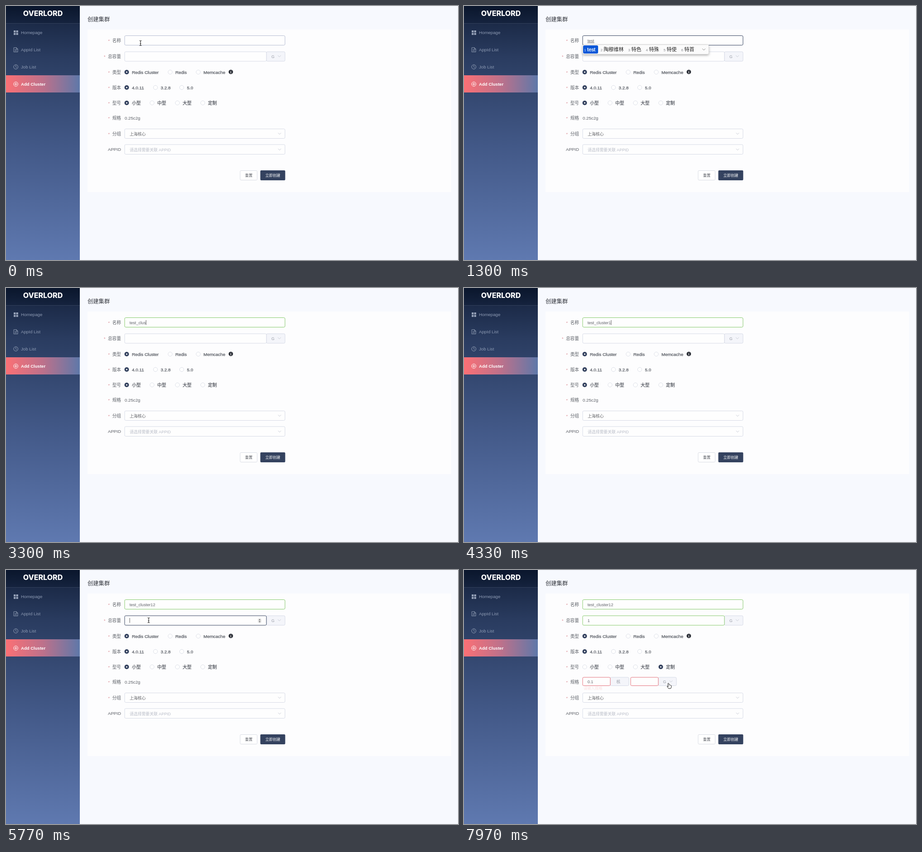
An HTML page that plays this animation: 998 px wide and 561 px high, repeating every 8 s.

```html
<!DOCTYPE html>
<html lang="zh">
<head>
<meta charset="utf-8">
<title>创建集群</title>
<style>
  html, body { margin: 0; width: 100%; height: 100%; overflow: hidden; background: #f7f9fe; }
  svg { display: block; width: 100%; height: 100%; }
  text { font-family: "Liberation Sans", "Noto Sans CJK SC", "Noto Sans CJK", sans-serif; font-size: 9.7px; fill: #5c6067; white-space: pre; }
  .brand { font: 800 16px Inter, sans-serif; fill: #fff; }
  .menu { fill: #8d9ab3; }
  .active { font-weight: bold; font-size: 9.55px; fill: #fff; }
  .title { font-size: 12.3px; fill: #33363d; }
  .option { font-size: 9.85px; fill: #53575f; stroke: #53575f; stroke-width: .25px; }
  .value { font-size: 9.15px; fill: #60636a; }
  .select { font-size: 8.9px; fill: #606266; }
  .hint { font-size: 8.85px; fill: #b9bdc8; }
  .unit { font-size: 8.8px; fill: #999da6; }
  .button { font-size: 8.3px; font-weight: 500; fill: #55585f; }
  .error { font-size: 8.3px; fill: #f56c6c; }
  .star { font-size: 9px; fill: #d98a92; }
  .index { font-size: 8px; fill: #85878c; }
  .word { font-size: 11px; fill: #222; }
  .picked { font-size: 11.3px; font-weight: 500; fill: #fff; stroke: #fff; stroke-width: .3px; }
</style>
</head>
<body>
<svg viewBox="0 0 998 561">
  <defs>
    <linearGradient id="side" x2="0" y2="1">
      <stop offset="0" stop-color="#14213b"/><stop offset=".2" stop-color="#2a3c60"/>
      <stop offset=".55" stop-color="#425887"/><stop offset="1" stop-color="#5f79b0"/>
    </linearGradient>
    <linearGradient id="head" x2="0" y2="1">
      <stop offset="0" stop-color="#0a162c"/><stop offset="1" stop-color="#15233e"/>
    </linearGradient>
    <linearGradient id="current">
      <stop offset="0" stop-color="#fb7075"/><stop offset=".5" stop-color="#bd718b"/><stop offset="1" stop-color="#5e78a9"/>
    </linearGradient>
    <filter id="shadow" x="-5%" y="-30%" width="110%" height="180%">
      <feDropShadow dx="0" dy="2" stdDeviation="2.5" flood-opacity=".3"/>
    </filter>
  </defs>
  <g id="page"></g>
  <g id="live"></g>
</svg>
<script>
const LOOP = 8000;
const DARK = '#34425f', PLAIN = '#d6dae6', HOVER = '#b6bdd2', GREEN = '#84c96a', RED = '#e4707b';

const text = (x, y, str, cls = '', anchor = 'start') =>
  `<text x="${x}" y="${y + 3.5}" class="${cls}" text-anchor="${anchor}">${str}</text>`;
const rect = (x, y, w, h, fill, stroke = 'none', r = 0) =>
  `<rect x="${x}" y="${y}" width="${w}" height="${h}" rx="${r}" fill="${fill}" stroke="${stroke}"/>`;
const path = (d, stroke, width = 1, fill = 'none') =>
  `<path d="${d}" stroke="${stroke}" stroke-width="${width}" fill="${fill}" stroke-linejoin="round" stroke-linecap="round"/>`;
const circle = (x, y, r, fill, stroke = 'none') =>
  `<circle cx="${x}" cy="${y}" r="${r}" fill="${fill}" stroke="${stroke}"/>`;
const chevron = (x, y, color = '#c0c4cf') => path(`M${x - 3} ${y - 1.5}l3 3 3-3`, color, .9);
const field = (x, y, w, h, stroke = PLAIN) => rect(x, y, w, h, '#fefefe', stroke, 2.5);
const addon = (x, y, w, h, str, tx) =>
  rect(x, y, w, h, '#f4f5fa', PLAIN, 2.5) + text(tx, y + h / 2, str, 'unit', 'middle');
const spinner = (x, y) => rect(x - 3.5, y - 5, 7, 10, '#f3f3f3', '#e2e2e2', 3) +
  path(`M${x - 1.5} ${y - 1.5}l1.5-2 1.5 2zM${x - 1.5} ${y + 1.5}l1.5 2 1.5-2z`, '#555', .5, '#555');
const caret = (x, y) => path(`M${x} ${y - 5}v10`, '#333', .8);
const radio = (x, y, str, on) =>
  (on ? circle(x, y, 5, DARK) + circle(x, y, 1.6, '#fff') : circle(x, y, 4.6, '#fff', '#dcdfe8')) +
  text(x + 11.5, y, str, 'option');
const label = (y, str) => text(254, y, str, '', 'end') + text(248.5 - str.length * 9.7, y, '*', 'star', 'end');

function drawPage() {
  const gray = '#98a4ba';
  const squares = [[17, 54], [22.5, 54], [17, 59.5], [22.5, 59.5]].map(([x, y]) => rect(x, y, 4.3, 4.3, gray)).join('');
  return rect(0, 0, 998, 561, '#f7f9fe') +
    rect(0, 0, 163, 561, 'url(#side)') + rect(0, 0, 163, 38, 'url(#head)') + rect(0, 38, 163, 1, '#33415c') +
    rect(0, 153, 163, 38, 'url(#current)') +
    text(81.5, 18.8, 'OVERLORD', 'brand', 'middle') +
    squares + text(33, 58.5, 'Homepage', 'menu') +
    path('M17.5 92h5.5l3 3v6.5h-8.5zM23 92v3h3M19.5 96.5h4M19.5 99h4', gray, .9) + text(33, 96.5, 'AppId List', 'menu') +
    circle(21.7, 134.5, 4.8, 'none', gray) + path('M21.7 131.5v3.2l2 1.3', gray, .9) + text(33, 134.5, 'Job List', 'menu') +
    circle(21.7, 172.5, 4.8, 'none', '#fff') + path('M19 172.5h5.4M21.7 169.8v5.4', '#fff') +
    text(33, 172.5, 'Add Cluster', 'active') +
    text(180, 30.3, '创建集群', 'title') +
    rect(180, 52, 803, 359, '#fdfdfe') +
    ['名称', '总容量', '类型', '版本', '型号', '规格', '分组'].map((s, i) => label([76, 111, 146, 180, 214, 247, 282][i], s)).join('') +
    text(254, 316, 'APPID', '', 'end') +
    radio(266.5, 146, 'Redis Cluster', true) + radio(362.5, 146, 'Redis') + radio(424.5, 146, 'Memcache') +
    circle(496.4, 145.6, 4.9, '#2c3038') + path('M496.8 142.8v.2M495.7 145h1l-.6 3.2h.8', '#fff', 1) +
    radio(266.5, 180, '4.0.11', true) + radio(330, 180, '3.2.8') + radio(388, 180, '5.0') +
    field(262, 271.5, 354, 21) + text(273, 282, '上海核心', 'select') + chevron(604, 282) +
    field(262, 306, 354, 21.5) + text(273, 317, '请选择需要关联 APPID', 'hint') + chevron(604, 317) +
    rect(517, 363.5, 37.5, 21, '#fff', '#d9dce4', 2) + text(536, 373.7, '重置', 'button', 'middle') +
    rect(561.5, 363, 55, 22, DARK, 'none', 2) +
    `<g style="--c:#fff">${text(589, 373.7, '立即创建', 'button', 'middle').replace('<text', '<text style="fill:#fff"')}</g>`;
}

// Latest entry of [time, value] pairs that has begun.
const at = (steps, t) => steps.filter(s => s[0] <= t).pop();
const clamp = v => Math.max(0, Math.min(1, v));

function blend(steps, t, duration = 150) {
  const i = steps.indexOf(at(steps, t));
  const share = clamp((t - steps[i][0]) / duration) * 100;
  return i ? `color-mix(in srgb, ${steps[i][1]} ${share}%, ${steps[i - 1][1]})` : steps[i][1];
}

const nameKeys = [[0, ''], [620, 't'], [760, 'te'], [900, 'tes'], [1040, 'test'], [2150, 'test_'], [2560, 'test_c'],
  [2780, 'test_cl'], [2980, 'test_clu'], [3160, 'test_clus'], [3440, 'test_clust'], [3600, 'test_cluste'],
  [3780, 'test_cluster'], [4130, 'test_cluster1'], [4520, 'test_cluster12']];
const sizeKeys = [[0, ''], [5950, '1']];
const coreKeys = [[0, ''], [7120, '0'], [7270, '0.'], [7420, '0.1']];
const nameBorder = [[0, HOVER], [320, DARK], [1560, GREEN]];
const sizeBorder = [[0, PLAIN], [5450, DARK], [5950, GREEN]];
const coreBorder = [[0, PLAIN], [6850, DARK], [7840, RED]];
const memoryBorder = [[0, PLAIN], [7840, RED]];
const FOCUS = { name: [320, 5450], size: [5450, 6430], core: [6850, 7840] };
const COMMIT = 1560, CUSTOM = 6430, INVALID = 7840;

const candidates = {
  t: ['他', '她', '它', '太', '听', '天'],
  te: ['特', '忒', '特别', '特色', '特殊', '特使'],
  tes: ['特殊', '特色', '特使', '特首', '特设', '特'],
  test: ['test', '陶穆维林', '特色', '特殊', '特使', '特首']
};

function imePopup(words) {
  let x = 265, items = '';
  words.forEach((word, i) => {
    const end = x + 7 + word.length * (word < '~' ? 4.9 : 11);
    if (!i) items += rect(263, 87, end + 4.5 - 263, 18, '#0b58d8', 'none', 3);
    items += text(x, 96.3, i + 1, 'index').replace('<text', i ? '<text' : '<text style="fill:#dbe7ff"') +
      text(x + 7, 96, word, i ? 'word' : 'picked');
    x = end + 10;
  });
  return `<g filter="url(#shadow)">${rect(262, 85.5, x + 22 - 262, 21, '#fbfbfb', '#d4d4d4', 3)}</g>` +
    items + chevron(x + 11, 96, '#777');
}

const measure = document.createElement('canvas').getContext('2d');
measure.font = '9.15px "Liberation Sans", sans-serif';

function typed(x, y, keys, [from, to], t, composing) {
  const [time, value] = at(keys, t);
  const width = measure.measureText(value).width;
  const blinkOn = (t - Math.max(time, from)) % 1060 < 530;
  return text(x, y, value, 'value') +
    (composing ? path(`M${x} ${y + 5}h${width}`, '#555', .8) : '') +
    (t >= from && t < to && blinkOn && !composing ? caret(x + width + .5, y) : '');
}

const moves = [[0, 297, 82], [4850, 297, 82], [5380, 315, 111], [6030, 315, 111], [6370, 437, 215], [6450, 437, 215],
  [6710, 290.5, 251], [7500, 290.5, 251], [7880, 453, 256], [8000, 453, 256]];
const pointers = [[0, 'beam'], [600, ''], [4850, 'beam'], [5930, ''], [6030, 'beam'], [6110, 'arrow'], [6300, 'hand'],
  [6510, 'arrow'], [6640, 'beam'], [7100, ''], [7500, 'beam'], [7780, 'hand']];
const shapes = {
  '': '',
  beam: path('M-2-5.5q2 0 2 1.5 0-1.5 2-1.5M0-4v8M-2 5.5q2 0 2-1.5 0 1.5 2 1.5M-1 1h2', '#222', 1.1),
  arrow: path('M0-5v11l2.6-2.5 1.8 4 1.7-.8-1.8-3.8h3.6z', '#fff', .8, '#111'),
  hand: path('M-2.6-5.5q1.3-1.2 2 .3l.9 3.3q1.2-.8 1.7.3 1.2-.5 1.6.5 1.2-.2 1.3 1l-.2 3.1-1.2 2.8H-1.4l-3-4.2q-.7-1.7 1.4-.8l.8.8z', '#222', 1, '#fff')
};

function pointer(t) {
  const i = moves.indexOf(at(moves, t));
  const [t0, x0, y0] = moves[i], [t1, x1, y1] = moves[i + 1] || [LOOP, x0, y0];
  const p = clamp((t - t0) / (t1 - t0)), ease = p * p * (3 - 2 * p);
  return `<g transform="translate(${x0 + (x1 - x0) * ease} ${y0 + (y1 - y0) * ease})">${shapes[at(pointers, t)[1]]}</g>`;
}

function drawLive(t) {
  const custom = t >= CUSTOM;
  const composing = t >= 620 && t < COMMIT;
  let out = field(262, 65.5, 354, 21, blend(nameBorder, t)) + typed(272.7, 76.3, nameKeys, FOCUS.name, t, composing) +
    addon(575, 101, 41, 21, 'G', 589.5) + chevron(603.5, 111) +
    field(262, 101, 313, 21, blend(sizeBorder, t)) + typed(272.7, 111.3, sizeKeys, FOCUS.size, t);
  if (t >= 5200 && t < 6110) out += spinner(560, 112);
  ['小型', '中型', '大型', '定制'].forEach((s, i) => out += radio(266.5 + 56 * i, 214, s, i === (custom ? 3 : 0)));
  if (custom) {
    out += addon(323, 237, 41, 18.5, '核', 341) + addon(429, 237, 40, 18.5, 'G', 443) + chevron(457, 246) +
      field(262, 237, 61, 18.5, blend(coreBorder, t, 100)) + field(368, 237, 61, 18.5, blend(memoryBorder, t, 100)) +
      typed(272.7, 246.3, coreKeys, FOCUS.core, t);
    if (t >= 6640 && t < 7640) out += spinner(307.5, 247);
    if (t >= INVALID) out += `<g opacity="${clamp((t - INVALID) / 300) ** 2}">${text(264, 260.5, '请输入规格', 'error')}</g>`;
  } else out += text(262, 247.5, '0.25c2g');
  if (composing) out += imePopup(candidates[at(nameKeys, t)[1]]);
  return out + pointer(t);
}

document.getElementById('page').innerHTML = drawPage();
const live = document.getElementById('live');
const start = performance.now();
function frame() {
  live.innerHTML = drawLive((performance.now() - start) % LOOP);
  requestAnimationFrame(frame);
}
frame();
</script>
</body>
</html>
```
